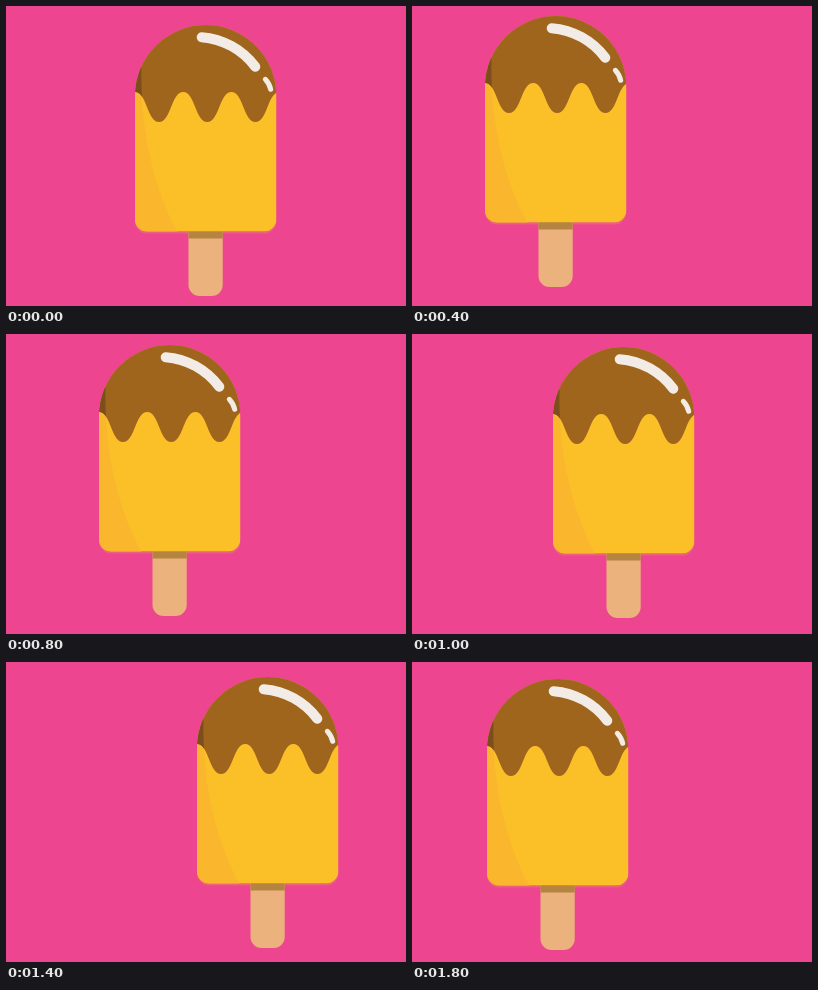
Write an HTML page that moves like this. It is 400 by 300 pixels and loops after 2000 ms.

```html
<!DOCTYPE html>
<html lang="en">
<head>
<meta charset="utf-8">
<title>Ice lolly</title>
<style>
  html, body { margin: 0; width: 100%; height: 100%; overflow: hidden; background: #ed458f; }
  svg { display: block; width: 100vw; height: 100vh; }
</style>
</head>
<body>
<svg viewBox="0 0 400 300">
  <defs>
    <path id="body" d="M0 71a70.7 71 0 0 1 141.4 0V194.5a12 12 0 0 1-12 12H12a12 12 0 0 1-12-12Z"/>
    <path id="glaze"/>
    <path id="shade" d="M6.500 42C5 100 17 160 42.500 207H-1V42Z"/>
    <clipPath id="inBody"><use href="#body"/></clipPath>
    <clipPath id="inGlaze"><use href="#glaze"/></clipPath>
  </defs>
  <g id="lolly">
    <use href="#body" y="2" fill="#ee6080"/>
    <rect x="53.500" y="180" width="34.200" height="91" rx="11" fill="#ecb27d"/>
    <rect x="53.500" y="200" width="34.200" height="13.500" fill="#b58440"/>
    <g clip-path="url(#inBody)">
      <use href="#body" fill="#fbbf28"/>
      <use href="#shade" fill="#fab72d"/>
      <use href="#glaze" fill="#a0651c"/>
      <use href="#shade" fill="#7c4e1b" clip-path="url(#inGlaze)"/>
    </g>
    <g fill="none" stroke="#f3ece6" stroke-linecap="round">
      <path d="M66.700 12.200A74 74 0 0 1 120.300 41.800" stroke-width="10"/>
      <path d="M130.300 54.300Q134.300 58.500 135.700 64.300" stroke-width="5"/>
    </g>
  </g>
</svg>
<script>
  const STEP = 200;
  // The lolly jumps between these spots (its top-left corner), back through the first before the last
  const start = [129, 19];
  const spots = [
    start, [109.5, 13], [73, 10], [73.5, 14.5], [93, 11],
    [141, 13], [201, 14], [191, 15], start, [75, 17]
  ];
  const lolly = document.getElementById('lolly');

  // Three equal drips along the lower edge of the glaze
  const drip = 'c12 0 12 30 24.1 30s12-30 24.1-30';
  document.getElementById('glaze').setAttribute('d', `M0 67${drip.repeat(3)}V0H0Z`);

  function draw() {
    const step = Math.floor(performance.now() / STEP) % spots.length;
    lolly.setAttribute('transform', `translate(${spots[step]})`);
    requestAnimationFrame(draw);
  }
  draw();
</script>
</body>
</html>
```
